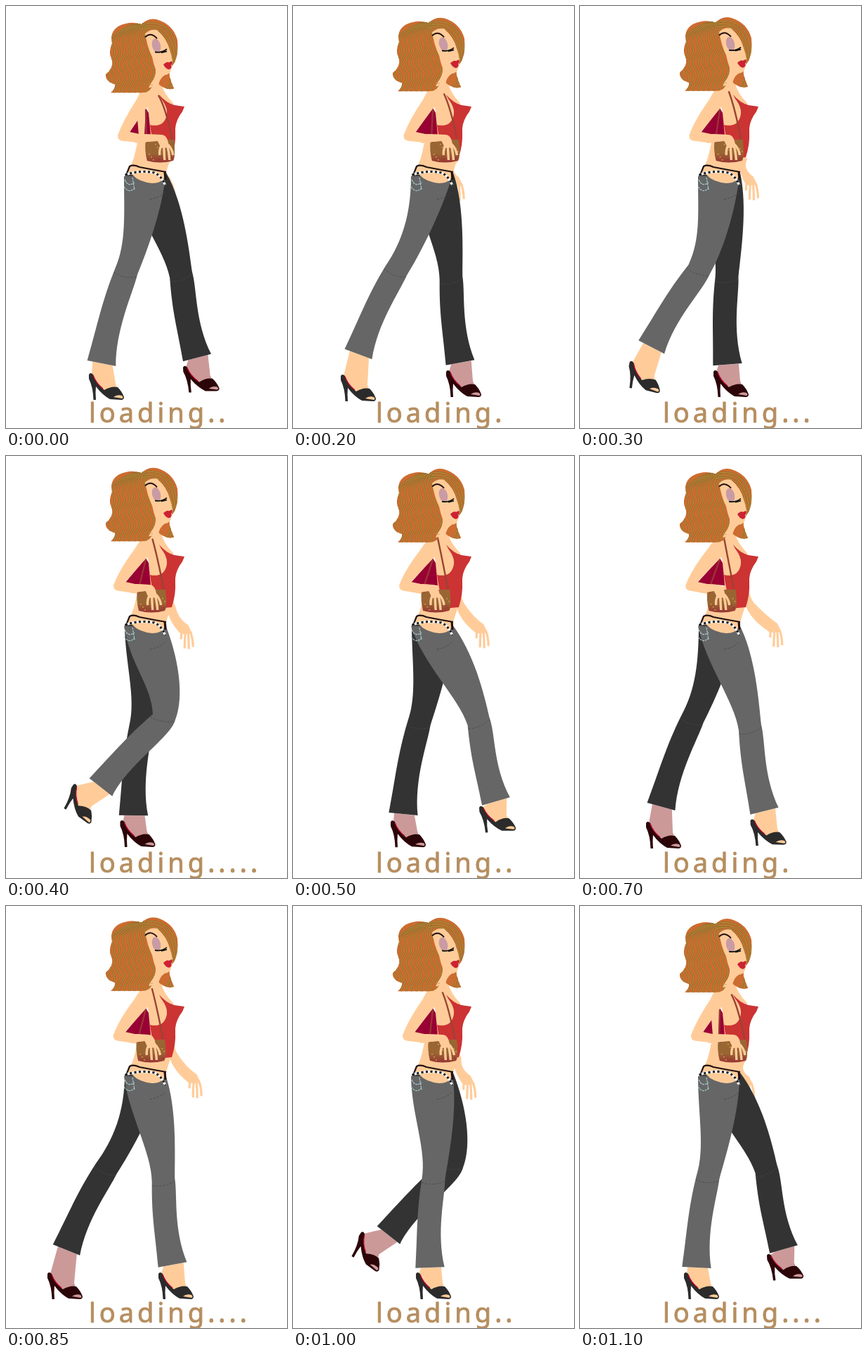
An HTML page with a canvas that plays this animation: 400 by 600 pixels, repeating every 1.15 s.

```html
<!DOCTYPE html>
<html lang="en">
<head>
<meta charset="utf-8">
<title>Loading</title>
<style>
html, body { margin: 0; width: 100%; height: 100%; overflow: hidden; background: #fff; }
canvas, svg { position: absolute; left: 0; top: 0; }
text {
  font: 400 38px "Noto Sans", "Open Sans", sans-serif;
  letter-spacing: 5px;
  fill: #b68e5f;
  stroke: #b68e5f;
  stroke-width: 0.9px;
}
</style>
</head>
<body>
<canvas id="stage" width="400" height="600"></canvas>
<svg width="400" height="600"><text id="label" x="118" y="591.5"></text></svg>
<script>
const ctx = document.getElementById('stage').getContext('2d');
const label = document.getElementById('label');
const STEP = 50, STEPS = 23, STRIDE = 25;
const SKIN = '#ffcc99', FAR_SKIN = '#cc9999';

// stride position, then knee x y, hem x y, shoe x y, shoe turn in degrees
const GAIT = [
  [0, 171, 378, 136, 508, 118, 524, 0],
  [4, 147, 376, 93, 495, 68, 526, 0],
  [5, 142, 376, 85, 492, 58, 526, 0],
  [8, 225, 371, 135, 471, 96, 467, 32],
  [9, 245, 372, 212, 498, 184, 503, 10],
  [10, 264, 377, 289, 491, 265, 500, -4],
  [12, 257, 377, 287, 490, 263, 503, -8],
  [13, 248, 385, 271, 503, 251, 517, -3],
  [17, 224, 390, 237, 510, 217, 523, 0],
  [20, 200, 388, 195, 514, 175, 523, 0],
  [22, 182, 386, 166, 514, 148, 523, 0],
  [25, 171, 378, 136, 508, 118, 524, 0]
];

const fill = (color, d) => { ctx.fillStyle = color; ctx.fill(new Path2D(d)); };
function line(color, width, d, dash = []) {
  ctx.strokeStyle = color;
  ctx.lineWidth = width;
  ctx.setLineDash(dash);
  ctx.stroke(new Path2D(d));
}
const add = (p, v, k) => [p[0] + v[0] * k, p[1] + v[1] * k];
function unit(a, b) {
  const x = b[0] - a[0], y = b[1] - a[1], r = Math.hypot(x, y);
  return [x / r, y / r];
}
const side = ([x, y]) => [y, -x];
const swing = (i, lag) => (1 - Math.cos(2 * Math.PI * (i - lag) / 24)) / 2;

function pose(u) {
  const n = GAIT.findIndex(k => k[0] > u), a = GAIT[n - 1], b = GAIT[n];
  const t = (u - a[0]) / (b[0] - a[0]);
  return a.map((v, j) => v + (b[j] - v) * t).slice(1);
}

function leg(u, cloth, skin, shoe) {
  const [kx, ky, mx, my, sx, sy, turn] = pose(u);
  const knee = [kx, ky], hem = [mx, my];
  const thigh = unit([198, 258], knee), shin = unit(knee, hem);
  const mean = unit([0, 0], add(thigh, shin, 1));
  const across = side(mean), out = side(shin), fore = side(thigh);
  const tilt = Math.atan2(-shin[0], shin[1]) - 0.07;
  const cuff = [Math.cos(tilt), Math.sin(tilt)];
  const kneeL = add(knee, across, -16.5), kneeR = add(knee, across, 16.5);
  const hemL = add(hem, cuff, -20.7), hemR = add(hem, cuff, 20.7);

  foot(add(hem, cuff, -13), add(hem, cuff, 16), sx, sy, turn * Math.PI / 180, skin, shoe);

  // thighs bow forward, calves bow back
  const back = [168, 242], front = [227, 240];
  const backBend = [168 + Math.max(0, thigh[0]) * 35, 296];
  const bow = (p, k, inset) => add(add(p, shin, k), out, inset - 8);
  fill(cloth, `M${back} C${backBend} ${add(add(kneeL, thigh, -40), fore, 8)} ${kneeL}
    C${bow(kneeL, 50, 2)} ${bow(hemL, -50, 9)} ${hemL} L${hemR}
    C${bow(hemR, -50, -6)} ${add(kneeR, mean, 26)} ${kneeR}
    C${add(add(kneeR, mean, -34), fore, 5)} ${add(add(front, thigh, 50), fore, 7)} ${front}Z`);
  line('#54405a', 0.8, `M${add(kneeL, shin, 5)} Q${add(knee, shin, 11)} ${add(kneeR, shin, 3)}`, [3, 2]);
}

function foot(ankleL, ankleR, x, y, turn, skin, shoe) {
  const c = Math.cos(turn), s = Math.sin(turn);
  const at = (px, py) => [x + px * c - py * s, y + px * s + py * c];
  fill(skin, `M${ankleL} L${at(4, 0)} L${at(13, 15)} L${at(28, 29)} L${at(42, 24)} L${at(38, 13)} L${ankleR}Z`);
  ctx.save();
  ctx.translate(x, y);
  ctx.rotate(turn);
  fill(shoe, `M0 0 Q2 -4 6 0 Q10 13 22 22 Q32 16 41 18 Q47 24 50 32 Q50 36 46 36
    L30 35 Q19 29 10 17 Q9 26 10 36 L6.5 36 Q6 18 0 6Z`);
  fill(skin, 'M35 32 Q40 28 47 30 Q50 33 47 34Z');
  line('#cc0033', 1.2, 'M6 1 Q10 12 20 20');
  ctx.restore();
}

function farArm(w) {
  const ex = 226 + 13 * w, ey = 214 - 14 * w;
  const wx = 224 + 50 * w, wy = 248 - 6 * w;
  fill(SKIN, `M228 170 L238 180 Q${ex + 2} ${ey} ${ex + 8} ${ey + 8}
    Q${wx - 8} ${wy - 14} ${wx + 7} ${wy - 4} L${wx + 13} ${wy + 8} L${wx - 3} ${wy + 9}
    Q${ex - 4} ${ey + 28} ${ex - 6} ${ey} Z`);
  for (const [x, y, tx, ty] of [[-1, 6, -3, 16], [3, 7, 2, 29], [7, 7, 8, 30], [10, 5, 14, 27]])
    line(SKIN, 3.2, `M${wx + x} ${wy + y} Q${wx + tx} ${wy + ty - 12} ${wx + tx} ${wy + ty}`);
}

function jeansTrim() {
  line('#a5cdd2', 1.2, 'M169 247 Q174 258 183 251 M168 257 Q175 267 183 259 M180 244 L183 261', [3, 1]);
  line('#4b4350', 0.9, 'M205 275 Q220 272 227 264', [3, 2]);
}

function torso() {
  fill(SKIN, `M200 108 L221 110 Q224 124 238 138 L240 180 L235 214 Q231 226 227 240
    Q224 252 208 252 Q189 250 180 240 L173 236 Q181 222 184 208 L187 194 L205 184 L203 150 L196 125Z`);
  line('#221111', 2.2, 'M172 238 L176 228 Q181 225 190 229 Q210 233 228 236');
  line('#221111', 3, 'M226 236 L227 247');
  const belt = 'M170 240 Q190 233 211 237 Q220 240 227 255';
  line('#f4f4f4', 3.4, belt);
  line('#111111', 3, belt, [3, 3.5]);
  fill('#cc3333', `M218 126 Q228 138 240 141 L254 143 Q252 150 247 156 Q240 168 241 180
    Q242 196 236 215 L214 217 L207 182 L205 169 Q223 173 228 158 Q232 146 221 132Z`);
}

function nearArm(w) {
  const ex = 160 - 9 * w, hx = 228 - 26 * w, px = 199 - 18 * w;
  fill('#990033', `M199 145 L${ex + 15} 181 L206 184 L203 152Z`);
  if (w < 0.15) fill(SKIN, 'M187 160 L199 145 L197 184 L189 184Z');

  line('#993333', 2.4, `M199 147 L${px + 1} 192`);
  fill(SKIN, `M208 108 Q194 113 ${186 - 5 * w} 133 Q${ex + 7} 162 ${ex - 1} 184
    Q${ex - 1} 192 ${ex + 8} 192 L${hx - 22} 196 L${hx - 9} 193 L${hx - 6} 183
    L${ex + 30} 182 L${ex + 16} 179 L199 146 L214 131 L221 122Z`);
  line('#994433', 2.4, `M${204 + 13 * (1 - w)} ${113 + 14 * (1 - w)} Q${px + 29} 145 ${px + 38} 192`);

  const bag = ctx.createLinearGradient(0, 188, 0, 223);
  bag.addColorStop(0, '#996633');
  bag.addColorStop(0.6, '#996633');
  bag.addColorStop(1, '#993333');
  fill(bag, `M${px} 190 L${px + 40} 190 Q${px + 43} 215 ${px + 39} 220
    Q${px + 20} 225 ${px + 2} 220 Q${px - 2} 205 ${px} 190Z`);
  for (let n = 0; n < 16; n++) {
    ctx.fillStyle = n % 2 ? '#cc9944' : '#993333';
    ctx.fillRect(px + 2 + n * 17 % 37, 193 + n * 11 % 26, 2, 1.5);
  }

  fill(SKIN, `M${ex + 24} 182 L${hx - 8} 183 Q${hx - 1} 182 ${hx + 2} 190 L${hx + 5} 201
    L${hx - 7} 202 L${hx - 12} 192 L${ex + 24} 195Z`);
  for (const [x, tx, ty] of [[-6, -9, 212], [-3, -2, 219], [1, 5, 219], [3, 10, 212]])
    line(SKIN, 3.4, `M${hx + x} 197 Q${hx + tx - 1} 204 ${hx + tx} ${ty}`);
}

function strand(d) {
  line('#96692f', 2.6, d);
  line('#c99a35', 0.9, d);
}

function head() {
  const hair = `M193 26 Q202 16 215 19 Q238 26 244 48 Q246 67 240 80 Q231 91 233 100
    Q235 108 239 117 Q229 121 216 110 L207 116 Q203 123 194 123 L149 123 Q156 117 155 111
    Q141 107 142 97 Q153 88 151 77 Q145 65 151 53 Q147 36 161 28 Q178 20 193 26Z`;
  ctx.save();
  fill('#cc6c30', hair);
  ctx.clip(new Path2D(hair));
  for (let k = 0; k < 10; k++) {
    let d = '';
    for (let n = 0; n <= 50; n++) {
      const t = n / 50, drop = t * t;
      const wave = 4 * Math.min(1, t * 1.5) * Math.sin(drop * 16 + 1.2 + k * 0.2);
      const x = 196 - (52 - 7 * k) * Math.min(1, t * 1.8) ** 0.8 + wave;
      d += `${n ? 'L' : 'M'}${x} ${25 + 100 * drop}`;
    }
    strand(d);
  }
  for (let k = 0; k < 3; k++)
    strand(`M${194 + 3 * k} ${32 - 4 * k} Q${223 + 6 * k} ${25 - 2 * k} ${234 + 4 * k} 58 T${228 + 5 * k} 118`);
  ctx.restore();

  fill(SKIN, `M198 39 Q206 32 215 34 Q229 46 233 62 Q236 70 237 78 L235 91 Q233 97 226 98
    Q218 103 217 114 L203 116 L206 110 Q214 100 213 90 Q210 82 208 72 Q201 58 198 39Z`);
  ctx.fillStyle = '#c99ba5';
  ctx.beginPath();
  ctx.ellipse(214, 56, 6, 10, -0.25, 0, 7);
  ctx.fill();
  line('#221111', 2, 'M198 44 Q206 36 215 46');
  line('#111111', 1.8, 'M212 65 Q221 67 229 61 M221 66 L229 64');
  fill('#cc2233', 'M224 83 Q229 78 232 80 L236 78 Q238 81 235 84 Q237 88 232 90 Q227 89 224 83Z');
  line('#cc9966', 0.8, 'M204 111 L209 112');
}

function draw(i) {
  const bob = 1.3 * Math.cos(2 * Math.PI * i / 12);
  ctx.clearRect(0, 0, 400, 600);
  ctx.lineJoin = 'round';
  farArm(swing(i, 1.5));
  ctx.save();
  ctx.translate(1, -3);
  leg((i + 13) % STRIDE, '#333333', FAR_SKIN, '#2c0508');
  ctx.restore();
  leg(i, '#666666', SKIN, '#2b2b2b');
  jeansTrim();
  torso();
  nearArm(swing(i, 0.7));
  ctx.save();
  ctx.translate(0, bob - 1);
  head();
  ctx.restore();
  label.textContent = 'loading' + '.'.repeat((i + 1) % 5 + 1);
}

const start = performance.now();
function tick() {
  draw(Math.floor((performance.now() - start) / STEP) % STEPS);
  requestAnimationFrame(tick);
}
tick();
</script>
</body>
</html>
```
